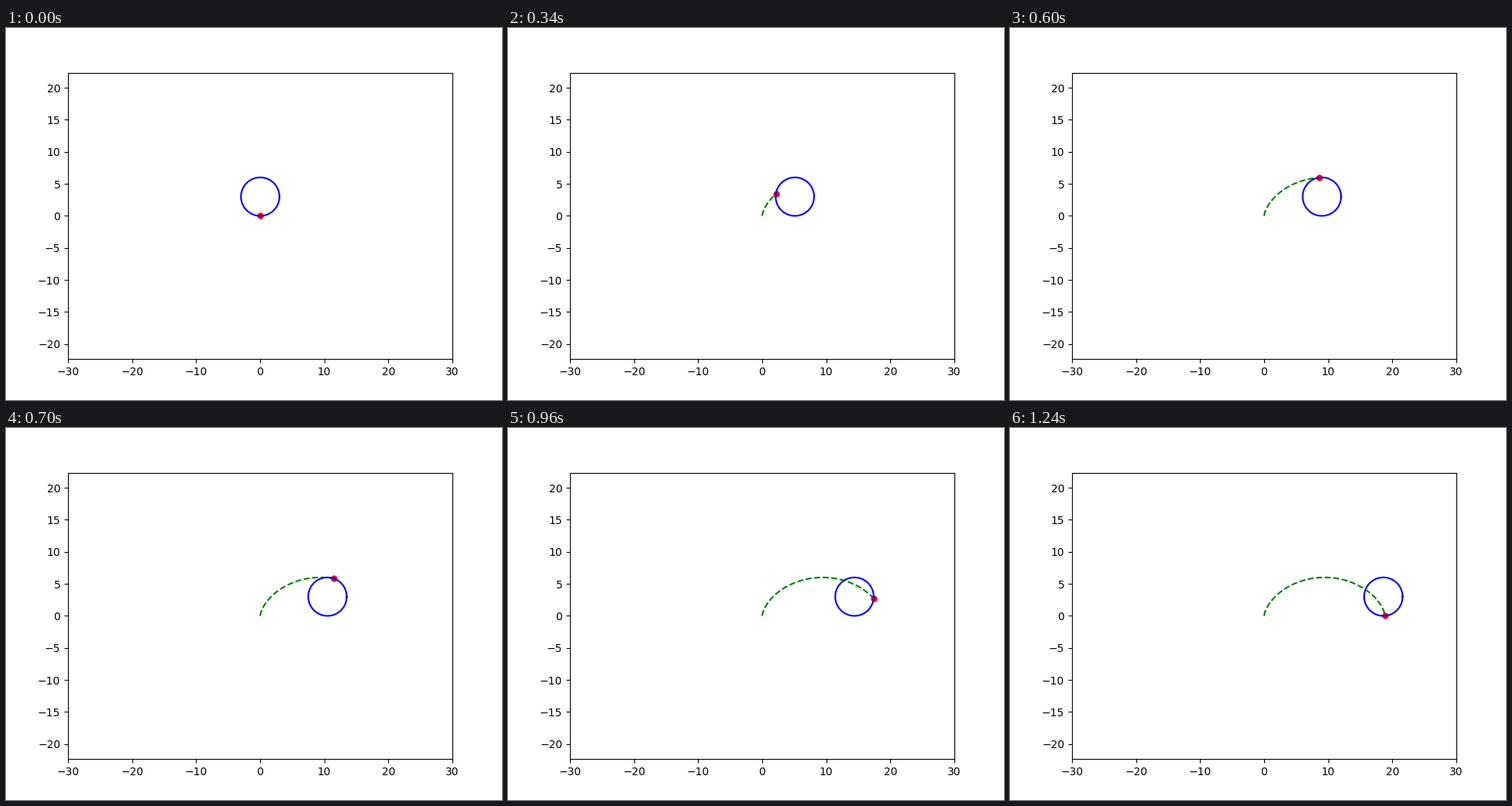
Animation, 640 px wide and 480 px high, one loop 1.26 s. Source, as a matplotlib script:

```python
import numpy as np
import matplotlib.pyplot as plt
from matplotlib.animation import FuncAnimation

RADIUS = 3
STEP = 0.1
FRAMES = 63
INTERVAL = 20

fig, ax = plt.subplots(figsize=(6.4, 4.8), dpi=100)
ax.set_aspect("equal", adjustable="datalim")
half_height = 30 * (0.77 * 480) / (0.775 * 640)
ax.set_xlim(-30, 30)
ax.set_ylim(-half_height, half_height)
ax.set_xticks(range(-30, 31, 10))
ax.set_yticks(range(-20, 21, 5))

trail, = ax.plot([], [], "g--")
dot, = ax.plot([], [], "ro", markersize=5)
wheel, = ax.plot([], [], "b-")

theta = np.linspace(0, 2 * np.pi, 100)


def cycloid(angle):
    return RADIUS * (angle - np.sin(angle)), RADIUS * (1 - np.cos(angle))


def update(i):
    angles = STEP * np.arange(i + 1)
    x, y = cycloid(angles)
    trail.set_data(x, y)
    dot.set_data(x[-1:], y[-1:])
    wheel.set_data(RADIUS * (angles[-1] + np.cos(theta)),
                   RADIUS * (1 + np.sin(theta)))
    return trail, dot, wheel


anim = FuncAnimation(fig, update, frames=FRAMES, interval=INTERVAL,
                     repeat=True, repeat_delay=0)
plt.show()
```
